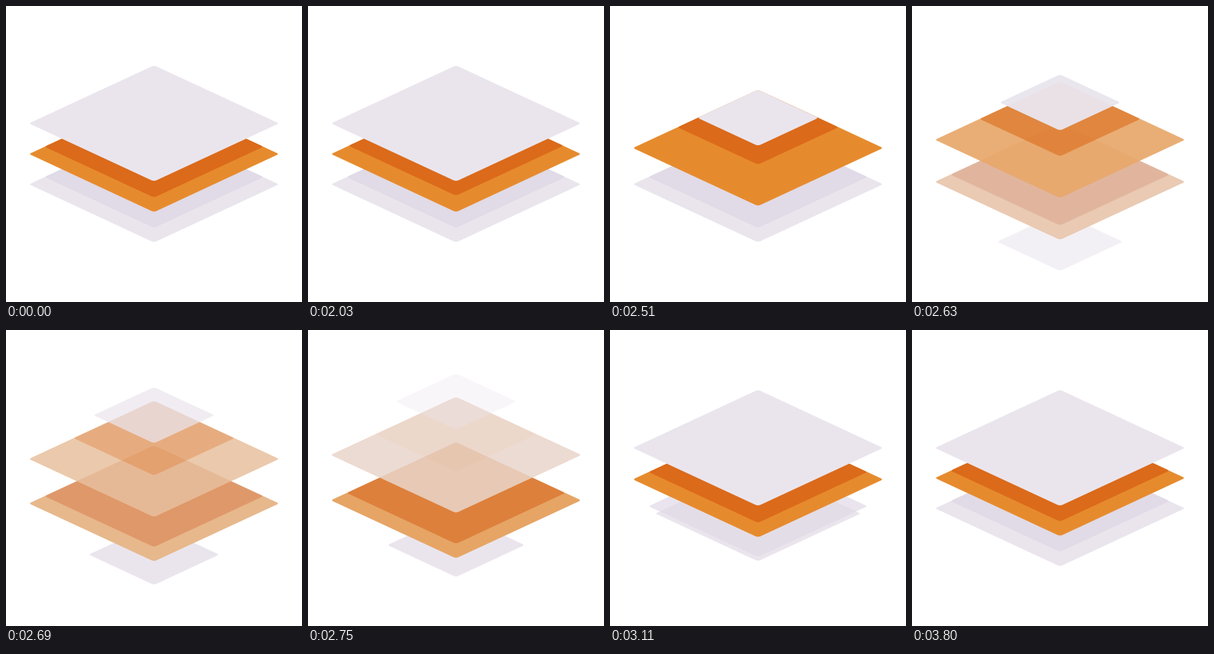
Recreate the animation shown at these times as an HTML page with a canvas. Size 400x400 px, loop 3.83 s.

```html
<!DOCTYPE html>
<html lang="en">
<head>
<meta charset="utf-8">
<title>Layers</title>
<style>
  html, body { margin: 0; width: 100%; height: 100%; overflow: hidden; background: #fff; }
  canvas { display: block; width: 400px; height: 400px; }
</style>
</head>
<body>
<canvas id="stage" width="400" height="400"></canvas>
<script>
const ctx = document.getElementById("stage").getContext("2d");
const LOOP = 3830, HOLD = 2030, STEP = 30;
const HALF_W = 169, HALF_H = 78.5, SMALL = 0.483, SHADE = 0.875;
const TOP = 158.6, MIDDLE = 200, BOTTOM = 241;
const LIGHT = "#eae5ed", LIGHT_SHADE = "#e1dae7";
const ORANGE = "#e68b2d", ORANGE_SHADE = "#db6a1a";

const ramp = (t, from, to) => Math.min(1, Math.max(0, (t - from) / (to - from)));
const quad = p => p < 0.5 ? 2 * p * p : 1 - 2 * (1 - p) ** 2;
const ease = (t, from, to) => quad(ramp(t, from, to));
const mix = (a, b, p) => a + (b - a) * p;

function diamond(y, scale, color, alpha = 1) {
  if (alpha <= 0) return;
  const w = HALF_W * scale, h = HALF_H * scale;
  ctx.globalAlpha = alpha;
  ctx.fillStyle = color;
  ctx.beginPath();
  ctx.moveTo(200 + w / 2, y - h / 2);
  ctx.arcTo(200 + w, y, 200, y + h, 1.2);
  ctx.arcTo(200, y + h, 200 - w, y, 8);
  ctx.arcTo(200 - w, y, 200, y - h, 1.2);
  ctx.arcTo(200, y - h, 200 + w, y, 8);
  ctx.closePath();
  ctx.fill();
}

// A shade shares the top corner of its full-size layer.
function shade(y, scale, color, alpha) {
  diamond(y - HALF_H * (1 - scale), scale, color, alpha);
}

function incoming(t) {
  const y = BOTTOM + (0.0049 * Math.max(0, 3500 - t)) ** 3;
  diamond(y, mix(SMALL, 1, ease(t, 2478, 3558)), LIGHT, ramp(t, 2550, 2690));
  shade(y, SHADE, LIGHT_SHADE, ramp(t, 2870, 3200));
}

function bottomToMiddle(t) {
  const y = mix(BOTTOM, MIDDLE, ease(t, 2480, 3220));
  const tint = ramp(t, 2540, 2840);
  diamond(y, 1, LIGHT);
  diamond(y, 1, ORANGE, tint);
  shade(y, SHADE, LIGHT_SHADE, 1 - tint);
  shade(y, SHADE, ORANGE_SHADE, tint);
}

function middleToTop(t) {
  const y = mix(MIDDLE, TOP + 0.7, ease(t, 2287, 2992));
  diamond(y, 1, ORANGE, 1 - ramp(t, 2600, 2900));
  diamond(y, 1, LIGHT, ramp(t, 2540, 2840));
  const size = mix(SHADE, 0.643, ramp(t, 1995, 2500));
  shade(y, size, ORANGE_SHADE, 1 - ramp(t, 2540, 2757));
}

function outgoing(t) {
  const y = TOP - 0.000458 * Math.max(0, t - 2382) ** 2;
  diamond(y, mix(1, SMALL, ease(t, 2015, 2505)), LIGHT, 1 - ease(t, 2590, 2860));
}

function draw(now) {
  const time = now % LOOP;
  const t = time < HOLD ? 0 : HOLD + STEP * Math.floor((time - HOLD) / STEP);
  ctx.globalAlpha = 1;
  ctx.fillStyle = "#fff";
  ctx.fillRect(0, 0, 400, 400);
  incoming(t);
  bottomToMiddle(t);
  middleToTop(t);
  outgoing(t);
}

const start = performance.now();
function tick() {
  draw(performance.now() - start);
  requestAnimationFrame(tick);
}
tick();
</script>
</body>
</html>
```
